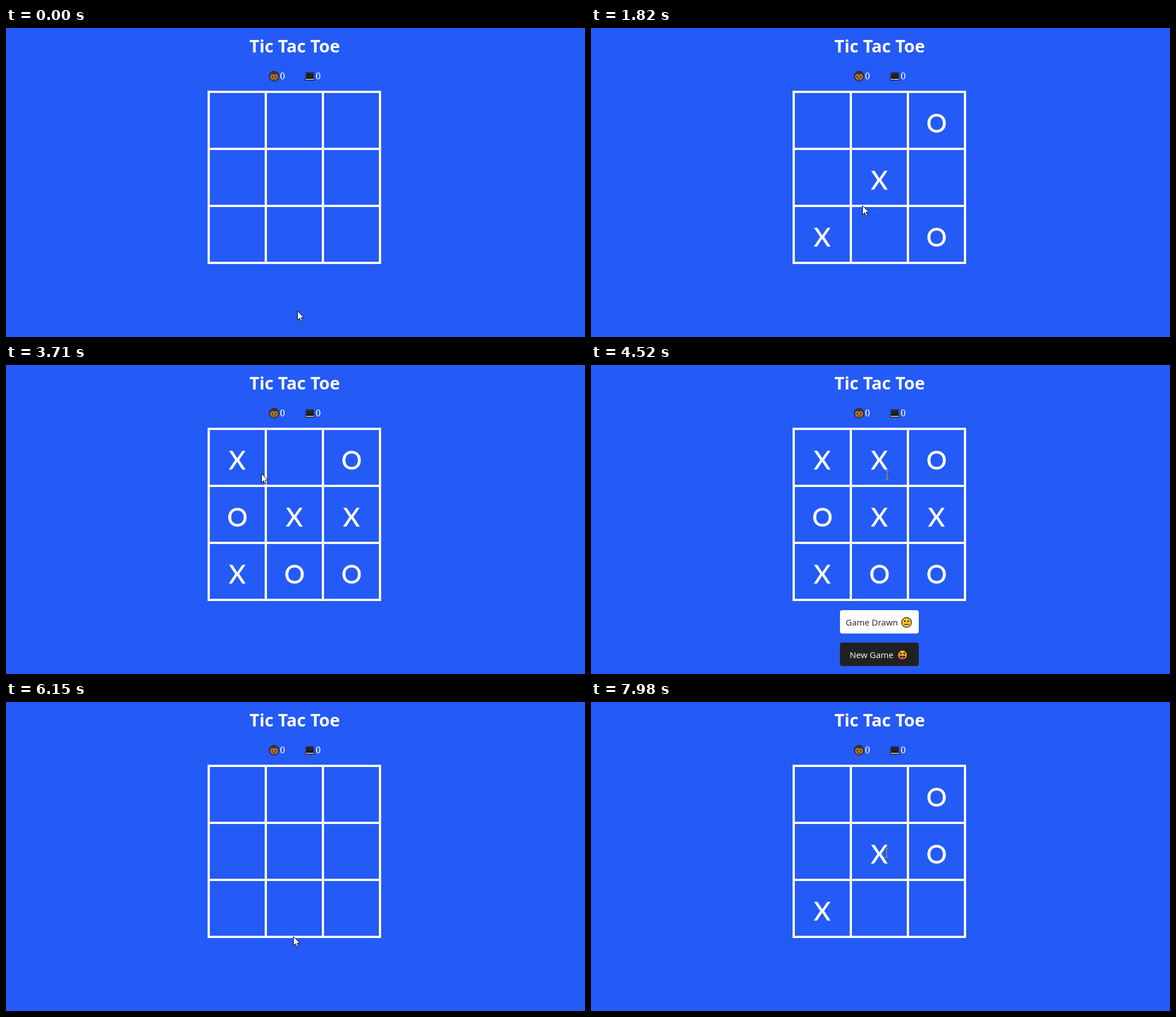
Write an HTML page that moves like this. It is 1014 px wide and 542 px high and loops after 8 s.

```html
<!DOCTYPE html>
<html lang="en">
<head>
<meta charset="utf-8">
<title>Tic Tac Toe</title>
<style>
  html, body { margin: 0; width: 100%; height: 100%; overflow: hidden; background: #245af6; }
  svg { display: block; width: 1014px; height: 542px; }
  text { font-family: "Open Sans", "Noto Sans", sans-serif; fill: #fff; }
  .title { font-size: 30.2px; font-weight: 700; text-anchor: middle; }
  .score { font: 16px "Noto Serif", serif; text-anchor: middle; }
  .label { font-size: 15px; }
  .mark { font: 44.5px Lato, sans-serif; text-anchor: middle; stroke: #fff; stroke-width: .8; }
  #beam { mix-blend-mode: difference; }
</style>
</head>
<body>
<svg viewBox="0 0 1014 542">
  <rect width="1014" height="542" fill="#245af6"/>
  <text class="title" x="505.5" y="43">Tic Tac Toe</text>

  <g transform="translate(469.5 84.5)">
    <circle r="8.3" fill="#a5713f" stroke="#111" stroke-width="1.2"/>
    <path d="M-7.6 0C-9-11 9-11 7.6 0L4-4Q0-2-4-4z" fill="#47301f"/>
    <circle cx="-3" cy="1" r="1.1"/>
    <circle cx="3" cy="1" r="1.1"/>
    <path d="M-2.5 4.5Q0 6 2.5 4.5" fill="none" stroke="#2a1708"/>
  </g>
  <text class="score" x="484.3" y="90">0</text>

  <g stroke="#0c0c0c">
    <rect x="525" y="78.5" width="14" height="10" rx="1" fill="#9a9a9a"/>
    <rect x="526.5" y="80" width="11" height="7.5" fill="#222"/>
    <path d="M524.5 88.5h15l1 3h-17z" fill="#b5b5b5"/>
  </g>
  <text class="score" x="546.8" y="90">0</text>

  <path d="M355 112h300v300h-300zM455 112v300M555 112v300M355 212h300M355 312h300"
        fill="none" stroke="#fff" stroke-width="4"/>
  <g id="marks"></g>

  <g id="result">
    <rect x="436" y="430" width="138" height="41" rx="4" fill="#fff"/>
    <text class="label" x="446" y="457" style="fill:#212121">Game Drawn</text>
    <g transform="translate(552.7 451.5)">
      <circle r="8.6" fill="#fcc52c" stroke="#111" stroke-width="1.2"/>
      <circle cx="-3" cy="-2" r="1.3"/>
      <circle cx="3" cy="-2" r="1.3"/>
      <path d="M-4 3.5h8" stroke="#111" stroke-width="1.3"/>
    </g>
    <rect x="436" y="487" width="138" height="41" rx="4" fill="#212121"/>
    <text class="label" x="453" y="514">New Game</text>
    <g transform="translate(545.5 508.5)">
      <circle r="8.2" fill="#fbb92a" stroke="#111"/>
      <path d="M-5.5-4.5l4 2-4 2M5.5-4.5l-4 2 4 2" fill="none" stroke="#111" stroke-width="1.2"/>
      <path d="M-5.5 1.5h11Q4.5 6 0 6T-5.5 1.5z" fill="#3a1210"/>
      <rect x="-2.5" y="3" width="5" height="5" rx="2" fill="#e63c3c"/>
    </g>
  </g>

  <path id="arrow" d="M.5.5v16l3.7-3.6 2.5 5.8 2.5-1.1-2.5-5.6h5z" fill="#fff" stroke="#000"/>
  <path id="hand" d="M5.5 15V2.5a2 2 0 0 1 4 0v6q2-1.5 3.2.3 2-1 2.9.7 2.900-.5 2.900 1.800v5q0 3-1.700 5v2.200H7.500v-2L1 13.200q-.5-3 2.200-2.200L5.500 13z"
        fill="#fff" stroke="#000"/>
  <path id="beam" d="M-3-7.5h3m1 0h3M.5-7v15M-3 8.5h3m1 0h3" stroke="#fff"/>
</svg>
<script>
const LOOP = 8000, DRAWN = 4140, RESET = 5630;
const $ = id => document.getElementById(id);

// time, cell taken by X, cell taken by O
const moves = [
  [720, 4, 8], [1560, 6, 2], [2400, 5, 3], [3460, 0, 7], [DRAWN, 1],
  [6580, 4, 5], [7360, 6, 2]
];

// pointer stops: time, x, y, and the end of a rest
const path = [
  [0, 510, 496, 130], [350, 542, 330], [520, 527, 247, 720], [800, 518, 245],
  [1000, 500, 285], [1480, 402, 363, 1560], [1820, 475, 311], [2340, 602, 264, 2420],
  [2910, 491, 295], [3160, 422, 246], [3380, 415, 185, 3500], [4040, 510, 199, 4280],
  [4520, 518, 193, 4530], [4800, 544, 428], [5170, 497, 517, 5370], [5420, 497, 515, 5930],
  [6420, 511, 271, 6740], [6780, 505, 278], [7150, 414, 348, 7440], [7980, 517, 264, LOOP]
].flatMap(([t, x, y, rest]) => rest ? [[t, x, y], [rest, x, y]] : [[t, x, y]]);

const marks = moves.flatMap(([from, ...cells]) => cells.map((cell, i) => {
  const x = 405 + cell % 3 * 100, y = 167 + Math.floor(cell / 3) * 100;
  const el = document.createElementNS("http://www.w3.org/2000/svg", "text");
  el.setAttribute("class", "mark");
  el.setAttribute("x", x + i * .3);
  el.setAttribute("y", y + 15.7);
  el.textContent = "XO"[i];
  $("marks").append(el);
  return { from, to: from < RESET ? RESET : LOOP, x, y, half: i ? 18 : 15, el };
}));

// Slope at a path point; zero next to a rest
function slope(i, k) {
  const a = path[i - 1], b = path[i], c = path[i + 1];
  const still = (p, q) => p[1] === q[1] && p[2] === q[2];
  if (!a || !c || still(a, b) || still(b, c)) return 0;
  return (c[k] - a[k]) / (c[0] - a[0]);
}

function pointer(t) {
  const i = path.findIndex(p => p[0] > t) - 1;
  const a = path[i], b = path[i + 1], d = b[0] - a[0], u = (t - a[0]) / d;
  const s = u * u * (3 - 2 * u);
  return [1, 2].map(k => Math.round(
    a[k] + (b[k] - a[k]) * s
    + d * u * (1 - u) * ((1 - u) * slope(i, k) - u * slope(i + 1, k))));
}

const show = (el, on) => { el.style.visibility = on ? "visible" : "hidden"; };
const inside = (x, y, l, t, r, b) => x >= l && x <= r && y >= t && y <= b;

function draw(t) {
  const [x, y] = pointer(t);
  const over = t >= DRAWN && t < RESET;
  let kind = "arrow";
  for (const m of marks) {
    const on = t >= m.from && t < m.to;
    show(m.el, on);
    if (on && Math.abs(x - m.x) <= m.half && Math.abs(y - m.y) <= 33) kind = "beam";
  }
  show($("result"), over);
  if (over && inside(x, y, 446, 440, 562, 462)) kind = "beam";
  if (over && inside(x, y, 436, 487, 574, 528)) kind = "hand";
  for (const id of ["arrow", "hand", "beam"]) {
    show($(id), id === kind);
    $(id).setAttribute("transform", `translate(${id === "hand" ? x - 7 : x} ${y})`);
  }
}

const start = performance.now();
function tick() {
  draw((performance.now() - start) % LOOP);
  requestAnimationFrame(tick);
}
tick();
</script>
</body>
</html>
```
